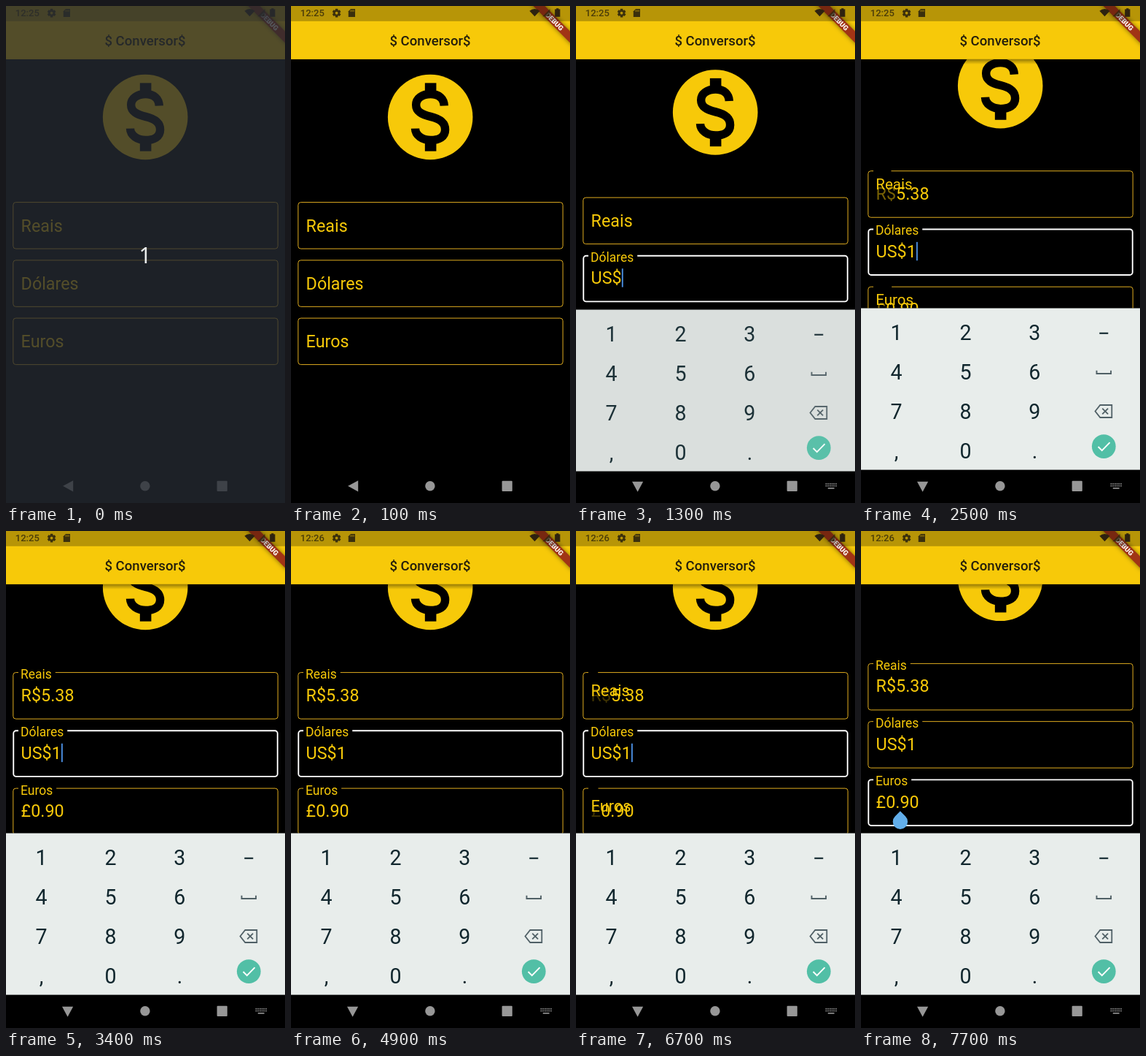
Write an HTML page with a canvas that moves like this. It is 383x680 px and loops after 8 s.

```html
<!DOCTYPE html>
<html lang="pt">
<head>
<meta charset="utf-8">
<title>Conversor</title>
<style>
  html, body { margin: 0; width: 100%; height: 100%; overflow: hidden; background: #000; }
  canvas { display: block; width: 383px; height: 680px; }
</style>
</head>
<body>
<canvas id="stage"></canvas>
<script>
const W = 383, H = 680, LOOP = 8000, STEP = 100, BLINK = 500;
const YELLOW = '#f7c909', BORDER = [223, 172, 31], BLUE = '#4a8ee0';
const BAR_TOP = 20.8, BAR_BOTTOM = 72.9, KEYS_TOP = 413.5, NAV_TOP = 634.6;
const FONT = 23.3, LEFT = 9.3, RIGHT = 373.7, TEXT_X = 20.6;
const FIELD_TOP = 268.1, FIELD_H = 64.5, PITCH = 79.25;

// Moments of the user's actions.
const FOCUS = 850, KEYS_IN = 1100, TYPE = 2400, MINUTE = 3700, ERASE = 5150, RETYPE = 6600, EURO = 7200;

const canvas = document.getElementById('stage');
const ctx = canvas.getContext('2d');
const dpr = window.devicePixelRatio || 1;
canvas.width = W * dpr;
canvas.height = H * dpr;

// Centre line of the dollar's S on a 24-unit grid.
const dollarCurve = new Path2D('M15.28 9.34C15.2 7.7 14.1 6.6 12.08 6.6S8.65 7.6 8.65 9.12' +
  'C8.65 10.7 10 11.4 12.08 11.9S15.5 13.2 15.5 14.94 14 17.4 12.08 17.4 8.5 16.3 8.45 14.67');

// Smooth rise from 0 to 1.
function ramp(t, start, duration) {
  const x = Math.min(1, Math.max(0, (t - start) / duration));
  return x * x * (3 - 2 * x);
}

function stateAt(t) {
  const typed = ramp(t, TYPE, 205);
  const euro = ramp(t, EURO, 300);
  const lastAction = [FOCUS, TYPE, ERASE, RETYPE, EURO].filter(a => a <= t).pop();
  return {
    scroll: 13 * ramp(t, 1200, 200) + 62 * typed + 12.2 * euro,
    dollarFloat: ramp(t, FOCUS, 150),
    otherFloat: typed - ramp(t, ERASE, 200) + ramp(t, RETYPE, 300),
    euro,
    filled: (t > TYPE && t < ERASE) || t > RETYPE,
    active: t > EURO ? 2 : 1,
    lit: Math.floor((t - lastAction) / BLINK) % 2 === 0,
    keys: ramp(t, KEYS_IN, 235)
  };
}

function setFont(size, weight = 400, family = 'Roboto') {
  ctx.font = `${weight} ${size}px ${family}, sans-serif`;
}

function text(str, x, y, size, color, align = 'left', weight = 400, family) {
  setFont(size, weight, family);
  ctx.textAlign = align;
  ctx.fillStyle = color;
  ctx.fillText(str, x, y);
}

function rect(x, y, w, h, color) {
  ctx.fillStyle = color;
  ctx.fillRect(x, y, w, h);
}

function disc(x, y, r, color) {
  ctx.fillStyle = color;
  ctx.beginPath();
  ctx.arc(x, y, r, 0, Math.PI * 2);
  ctx.fill();
}

function trace(points) {
  ctx.beginPath();
  points.forEach(([x, y], i) => i ? ctx.lineTo(x, y) : ctx.moveTo(x, y));
}

function poly(points, color) {
  trace(points);
  ctx.closePath();
  ctx.fillStyle = color;
  ctx.fill();
}

function line(points, color, width, closed) {
  trace(points);
  if (closed) ctx.closePath();
  ctx.strokeStyle = color;
  ctx.lineWidth = width;
  ctx.stroke();
}

function triangle(x, y, r, angle, color) {
  ctx.save();
  ctx.translate(x, y);
  ctx.rotate(angle);
  poly([[-r, -r], [r, -r], [0, r * 0.85]], color);
  ctx.restore();
}

function coin(x, y) {
  ctx.save();
  ctx.translate(x, y);
  ctx.scale(5.83, 5.83);
  ctx.translate(-12, -12);
  disc(12, 12, 10, YELLOW);
  ctx.lineWidth = 1.96;
  ctx.strokeStyle = '#000';
  ctx.stroke(dollarCurve);
  rect(10.74, 4, 2.67, 2.4, '#000');
  rect(10.74, 17.6, 2.67, 2.4, '#000');
  ctx.restore();
}

// The border grows inwards when focused and opens a gap for the label.
function outline(y, gap, focus) {
  const width = 1 + 0.9 * focus, inset = width / 2, r = 3.7, start = 17;
  const left = LEFT + inset, right = RIGHT - inset, top = y + inset, bottom = y + FIELD_H - inset;
  ctx.beginPath();
  ctx.moveTo(start + gap, top);
  ctx.arcTo(right, top, right, bottom, r);
  ctx.arcTo(right, bottom, left, bottom, r);
  ctx.arcTo(left, bottom, left, top, r);
  ctx.arcTo(left, top, start, top, r);
  ctx.lineTo(start, top);
  ctx.strokeStyle = `rgb(${BORDER.map(c => Math.round(c + (255 - c) * focus))})`;
  ctx.lineWidth = width;
  ctx.stroke();
}

function handle(x, y) {
  const r = 10.2;
  ctx.fillStyle = '#62aeea';
  ctx.beginPath();
  ctx.arc(x, y + r * Math.SQRT2, r, -Math.PI / 4, Math.PI * 1.25);
  ctx.lineTo(x, y);
  ctx.fill();
}

function field(f, top, lit) {
  const baseline = top + 39.4;
  setFont(FONT * 0.75);
  outline(top, f.float * (ctx.measureText(f.label).width + 8), f.focus);
  setFont(FONT);
  const valueX = TEXT_X + ctx.measureText(f.prefix).width;
  const caretX = valueX + ctx.measureText(f.value.slice(0, f.caret)).width;

  ctx.globalAlpha = f.float;
  text(f.prefix, TEXT_X, baseline, FONT, YELLOW);
  ctx.globalAlpha = 1;
  text(f.value, valueX, baseline, FONT, YELLOW);
  text(f.label, TEXT_X - 0.6 * f.float, top + 40.6 - 31.6 * f.float, FONT * (1 - 0.25 * f.float), YELLOW);
  if (lit) rect(caretX + 0.2, top + 18.4, 1.9, 25.4, BLUE);
  if (f.handle) handle(caretX + 0.5, top + 43.9);
}

function body(s, limit) {
  ctx.save();
  ctx.beginPath();
  ctx.rect(0, BAR_BOTTOM, W, limit - BAR_BOTTOM);
  ctx.clip();
  coin(191.2, 152 - s.scroll);

  const value = v => s.filled ? v : '';
  [
    { label: 'Reais', prefix: 'R$', value: value('5.38'), caret: 0, float: s.otherFloat, focus: 0 },
    { label: 'Dólares', prefix: 'US$', value: value('1'), caret: 1, float: s.dollarFloat, focus: s.dollarFloat - s.euro },
    { label: 'Euros', prefix: '£', value: value('0.90'), caret: 2, float: s.otherFloat, focus: s.euro, handle: s.euro > 0.5 }
  ].forEach((f, i) => field(f, FIELD_TOP + PITCH * i - s.scroll, s.lit && i === s.active));
  ctx.restore();
}

function appBar() {
  const shade = ctx.createLinearGradient(0, BAR_BOTTOM, 0, BAR_BOTTOM + 7);
  shade.addColorStop(0, 'rgba(0,0,0,.38)');
  shade.addColorStop(1, 'rgba(0,0,0,0)');
  rect(0, BAR_BOTTOM, W, 7, shade);
  rect(0, 0, W, BAR_BOTTOM, YELLOW);
  text('$ Conversor$', 191, 53.8, 18.6, '#251f0b', 'center', 500);
}

function ribbon() {
  ctx.save();
  ctx.translate(W, 0);
  ctx.rotate(Math.PI / 4);
  ctx.shadowColor = 'rgba(0,0,0,.5)';
  ctx.shadowBlur = 6 * dpr;
  rect(-40, 24.4, 80, 11.2, '#a13415');
  ctx.shadowBlur = 0;
  text('DEBUG', 0, 33.4, 9.5, '#fff', 'center', 900);
  ctx.restore();
}

function gear(x, y, color) {
  ctx.save();
  ctx.translate(x, y);
  for (let i = 0; i < 6; i++) {
    rect(-1.7, -5.8, 3.4, 3, color);
    ctx.rotate(Math.PI / 3);
  }
  ctx.beginPath();
  ctx.arc(0, 0, 3.2, 0, Math.PI * 2);
  ctx.strokeStyle = color;
  ctx.lineWidth = 2.6;
  ctx.stroke();
  ctx.restore();
}

function statusBar(t) {
  const ink = '#3b300c', dark = '#2e220f';
  rect(0, 0, W, BAR_TOP, 'rgba(0,0,0,.26)');
  text(t < MINUTE ? '12:25' : '12:26', 12.8, 14.4, 13, '#4a3c09', 'left', 500);
  gear(62.6, 9.6, ink);

  poly([[82, 4], [88, 4], [88, 15], [78.8, 15], [78.8, 7.2]], ink);
  for (let i = 0; i < 3; i++) rect(81.6 + 2 * i, 5.4, 1, 2.4, '#a88709');

  ctx.beginPath();
  ctx.moveTo(334.5, 14.2);
  ctx.arc(334.5, 14.2, 10.3, -Math.PI * 0.74, -Math.PI * 0.26);
  ctx.fillStyle = dark;
  ctx.fill();
  poly([[355.5, 4], [355.5, 14.2], [345.3, 14.2]], 'rgba(46,39,15,.75)');
  rect(364.2, 3.2, 3.2, 2, dark);
  rect(362.2, 4.4, 7.2, 10.4, dark);
}

function navBar(open) {
  const grey = '#979797';
  rect(0, NAV_TOP, W, H - NAV_TOP, '#000');
  triangle(84.6, open ? 658.4 : 656.8, 7.6, open ? 0 : Math.PI / 2, grey);
  disc(190.9, 656.7, 6.7, grey);
  ctx.beginPath();
  ctx.roundRect(289.6, 649.8, 14.2, 14.2, 1);
  ctx.fill();
  if (!open) return;
  for (let i = 0; i < 12; i++) rect(342.6 + 2.7 * (i % 6), i < 6 ? 653 : 655.8, 1.6, 1.6, grey);
  rect(345.8, 659, 8.8, 1.6, grey);
}

function keyboard(alpha) {
  const ink = '#10262d', soft = '#506066';
  ctx.save();
  ctx.globalAlpha = alpha;
  ctx.translate(0, 33 * (1 - alpha));
  rect(0, KEYS_TOP, W, NAV_TOP - KEYS_TOP, '#e8edeb');
  ['123', '456', '789', ',0.'].forEach((row, r) =>
    [...row].forEach((key, c) => text(key, 48.6 + 94.9 * c, 457.2 + 53.9 * r, 28.6, ink, 'center')));

  ctx.translate(333.3, 0);
  rect(-6, 446.7, 12, 2.1, ink);
  line([[-9.8, 498.8], [-9.8, 503], [9.8, 503], [9.8, 498.8]], soft, 1.9);
  line([[-11.8, 554.5], [-5, 546], [11, 546], [11, 563], [-5, 563]], soft, 1.8, true);
  line([[-2, 550.6], [5.8, 558.4]], soft, 1.8);
  line([[5.8, 550.6], [-2, 558.4]], soft, 1.8);
  disc(0, 602.6, 16.4, '#52bfa6');
  line([[-7.7, 603], [-2.5, 608.2], [8.3, 597.2]], '#fff', 1.9);
  ctx.restore();
}

function countdown() {
  rect(0, 0, W, H, 'rgba(38,43,50,.78)');
  text('1', 191, 351.5, 30, '#e9ecec', 'center', 400, "'Noto Sans'");
}

function draw(t) {
  const s = stateAt(t);
  ctx.setTransform(dpr, 0, 0, dpr, 0, 0);
  rect(0, 0, W, H, '#000');
  body(s, s.keys ? KEYS_TOP + 33 * (1 - s.keys) : NAV_TOP);
  appBar();
  ribbon();
  statusBar(t);
  navBar(t > FOCUS);
  if (s.keys) keyboard(s.keys);
  if (t < STEP) countdown();
}

function tick() {
  const t = performance.now() % LOOP;
  draw(Math.floor(t / STEP) * STEP);
  requestAnimationFrame(tick);
}
tick();
</script>
</body>
</html>
```
